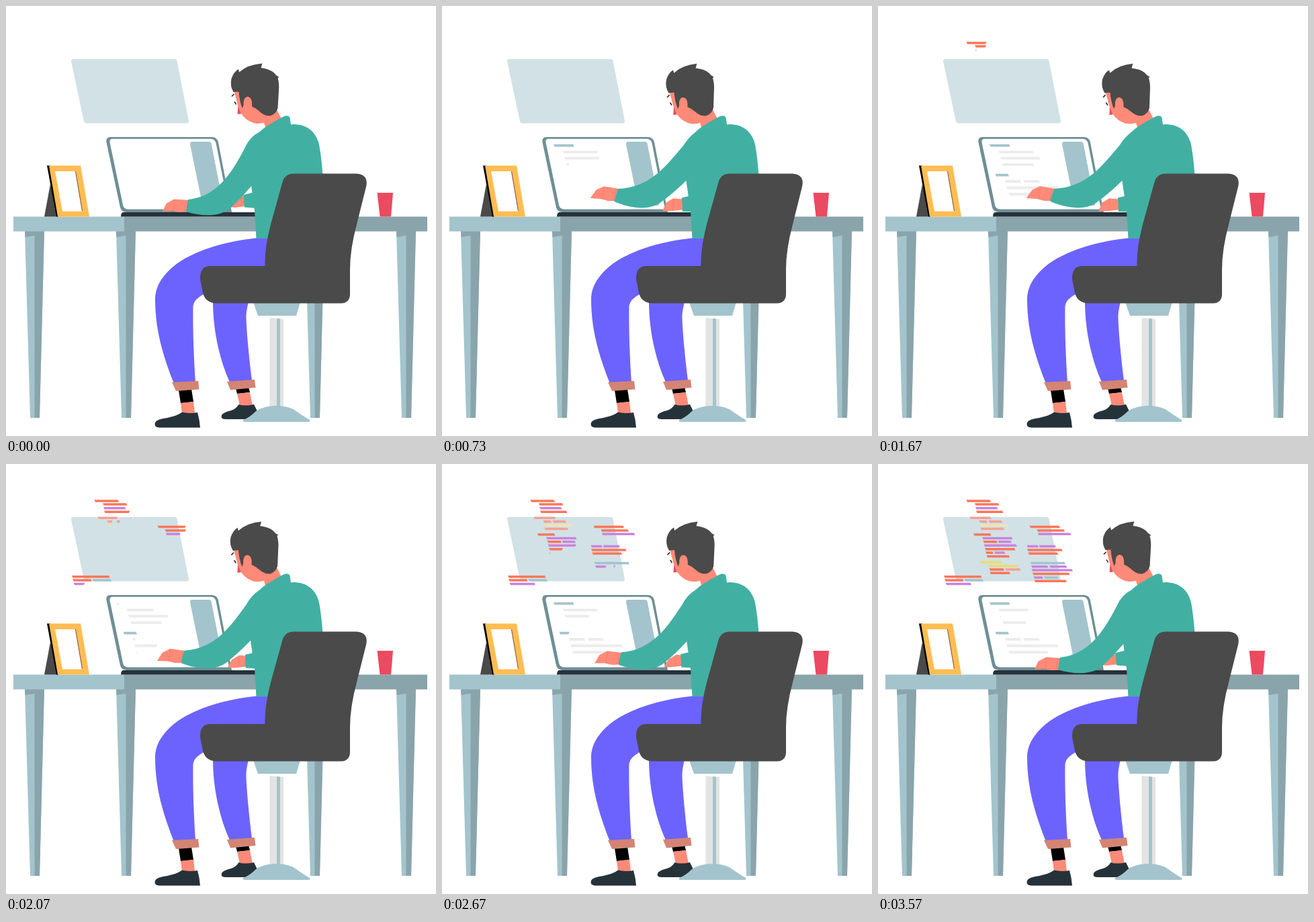
These frames come from a looping animation (640x640 px, 3600 ms). An HTML page:

```html
<!DOCTYPE html>
<html lang="en">
<head>
<meta charset="utf-8">
<title>Working at a desk</title>
<style>
html, body { margin: 0; width: 100%; height: 100%; overflow: hidden; background: #fff; }
svg { display: block; width: 100vw; height: 100vh; }
</style>
</head>
<body>
<svg viewBox="0 0 640 640" xmlns="http://www.w3.org/2000/svg">
  <path d="M100 82H251.500L269 171.500H119Z" fill="#d1e1e6" stroke="#d1e1e6" stroke-width="6" stroke-linejoin="round"/>
  <g id="code"></g>

  <g id="legs"></g>
  <path d="M11 313.500H177V335.500H11Z" fill="#a3c4cc"/>
  <path d="M176 313.500H627V335.500H176Z" fill="#8aa4ab"/>

  <g id="frame">
    <path d="M66 265L57 313.500H78Z" fill="#4a4a4a"/>
    <path d="M61 237.500H66L78 313.500H75Z" fill="#000"/>
    <path d="M64 237.500H111L124 313.500H77Z" fill="#ffbd52"/>
    <path d="M73 246H104L114 305.500H84Z" fill="#fff"/>
    <path d="M103.500 246L113.500 305" stroke="#8a5a3c" stroke-width="1.200"/>
  </g>
  <path d="M552.500 278H576L573 313.500H556.500Z" fill="#ec4a60"/>

  <g id="laptop">
    <path d="M156 195H306Q314 195 316 203L336 307H180Q172 307 170 300L149.500 203Q148 195 156 195Z" fill="#6f8f96"/>
    <path d="M158 197.700H305Q311 198 312.500 204L332 302.500H182Q175 302 174 296L154.500 203Q154 198 158 197.700Z" fill="#fff"/>
    <path d="M277 202H302Q305 202 305.700 205L323 294Q323.500 297 320 297H296Q293 297 292 294L274 206Q273.500 202 277 202Z" fill="#a3c4cc"/>
    <g id="page"></g>
    <path d="M174 307H380V313.500H171Q171 308 174 307Z" fill="#26323a"/>
  </g>

  <path id="backHand" fill="#ff8a78"/>
  <path id="backFinger" fill="none" stroke="#f3776a" stroke-width=".7"/>
  <path id="backSleeve" fill="#41b0a3"/>

  <g id="feet">
    <path d="M342 569L361 567L363 575L344 577Z" fill="#000"/>
    <path d="M344 577L363 575L367 595H348Z" fill="#ff8a78"/>
    <path d="M321 609Q323 605 335 602Q342 600 346.500 593Q355 596 369 593L374 603L373 612Q368 615 355 615H327Q319 615 321 609Z" fill="#26323a"/>
    <path d="M257 572L276 570L279 589L260 591Z" fill="#000"/>
    <path d="M260 591L279 589L281 606H262Z" fill="#ff8a78"/>
    <path d="M222 620Q224 615 240 613Q255 610 262 604.500Q272 607 285 605Q288 615 289 627.500H228Q220 627 222 620Z" fill="#26323a"/>
  </g>
  <g id="pants" fill="#6c63ff">
    <path d="M308 440C308 480 317 525 333 560L366 557C361 520 357 470 357.500 460Q358 452 361 440Z"/>
    <path d="M390 345.500H372C330 350 285 362 255 383C230 402 222 420 222 437C222 480 233 520 250 562L282 560C279 520 278 470 278.500 446Q280 436 296 428L400 420Z"/>
    <path d="M329 559L370 556L371.500 568L334 571.500Z" fill="#d48473"/>
    <path d="M247 560L286 558L287.500 570.500L253 573Z" fill="#d48473"/>
  </g>

  <path d="M380 158L403 154L410 168L386 181Z" fill="#ff8a78"/>
  <g id="head">
    <path d="M339 124L345.500 150Q351 168 368 174Q382 177 391 170L404 152L380 110H345Z" fill="#ff8a78"/>
    <path d="M345.500 149L344.500 161L350 160.500Z" fill="#e8505f"/>
    <path d="M336 134.500L339.500 131M340 142.500Q341.500 144 342.500 146.500" fill="none" stroke="#26262b" stroke-width="1.600"/>
    <path d="M338.500 128Q333 119 335.500 108Q339 98 346 94L347 98.500Q360 87 381.500 85.500L379.500 92Q392 93.500 399 99.500Q402 104 406.500 106L404.500 107Q407 116 406 126L404.500 152Q402 161 393 163.500Q385 164 378 157.500Q372 152 366 149.500Q367 135 359 135Q353 136 353.500 148L351.500 152Q347.500 141 346.500 127.500Z" fill="#4a4a4a"/>
  </g>

  <path id="torso" fill="#41b0a3"/>
  <path id="hand" fill="#ff8a78"/>
  <path id="fingers" fill="none" stroke="#f3776a" stroke-width=".7"/>
  <path id="arm" fill="#41b0a3"/>

  <g id="chair">
    <path d="M392.500 464L413 466V600H392.500Z" fill="#e3e3e3"/>
    <path d="M403 465L408 465.500V600H403Z" fill="#a3c4cc"/>
    <path d="M368 441H438L432 461H375Z" fill="#a3c4cc"/>
    <path d="M353 616Q362 613 372 603Q384 595 402 595Q421 595 432 603Q443 611 452 616Q454 619 449 619H356Q351 619 353 616Z" fill="#a3c4cc"/>
    <path d="M411.500 262Q415 249.500 428 249.500H522Q540 251 536 269L522 325Q511.500 364 512 395V430Q511 442.500 498 442.500H313Q297 442 293 427L289 407Q288 388 303 387H385.500Q384.500 362 394 325Z" fill="#4a4a4a"/>
  </g>
</svg>
<script>
const LOOP = 3600, CYCLE = 1200, TYPE = 200;
const INK = { o: '#fa775b', p: '#cc83dc', b: '#a3c4cc', y: '#ecdc72', l: '#f5a193', c: '#f0e5b2', g: '#ececec' };
const el = id => document.getElementById(id);
const clamp = v => Math.max(0, Math.min(1, v));

function add(parent, fill, d = '') {
  const p = document.createElementNS('http://www.w3.org/2000/svg', 'path');
  p.setAttribute('fill', fill);
  p.setAttribute('d', d);
  parent.append(p);
  return p;
}

for (const x of [28, 164, 445, 581]) {
  add(el('legs'), '#a3c4cc', `M${x} 335h29l-7 278h-14Z`);
  add(el('legs'), '#8aa4ab', `M${x + 14.5} 335h14.500l-7 278h-7.500ZM${x} 335h15v6.500l-14.500 2.500Z`);
}

// Left code column: x, y, width, ink, delay; lines start from top to bottom
const column = [
  [131.5, 55, 35, 'o', 0], [144, 60, 35, 'o', 0], [145, 65.7, 32, 'p', 0], [146, 71.3, 39, 'o', 130],
  [136.5, 80.3, 31, 'l', 0], [150.5, 85.7, 11, 'l', -40], [164.5, 85.7, 19, 'l', 50],
  [151.5, 91.3, 41, 'c', 0], [152.5, 96.5, 34, 'l', 0], [142, 105, 25, 'o', 0],
  [155, 110.5, 44, 'p', 0], [156.5, 115.7, 20, 'o', -40], [178.5, 115.7, 19, 'p', 40],
  [157.5, 121.3, 48, 'p', 0], [159, 126.7, 44, 'o', 0], [160, 132, 10.5, 'o', 0], [173, 132, 15, 'p', 50],
  [161.500, 137.5, 33, 'o', 0], [151, 146.3, 32, 'y', 0], [164, 151.7, 43, 'y', 0],
  [165.500, 157, 21, 'o', 0], [189, 157, 22, 'l', 90], [166.500, 162.3, 29, 'o', 60]
].map(([x, y, w, ink, late]) => [x, y, w, ink, 2040 + (y - 91) * 15 + late]);

// Other code groups: x, y, width, ink, start time
const groups = [
  [98, 167.7, 55, 'o', 1760], [99, 173, 27, 'o', 1820], [128.500, 173, 27, 'b', 1870], [100.500, 178.5, 37, 'p', 1980],
  [225.500, 93.5, 44, 'o', 1880], [236.500, 99, 40, 'o', 1914], [238, 104.2, 48, 'p', 1980],
  [221.500, 122.5, 16, 'p', 2160], [239.500, 122.5, 24, 'p', 2240], [222, 128, 51, 'o', 2280],
  [223.500, 133.3, 43, 'o', 2350], [226.500, 147.5, 51, 'b', 2430],
  [228, 152.8, 24, 'p', 2530], [255, 152.8, 25, 'p', 2646], [228.500, 158, 60, 'p', 2810],
  [230, 163.5, 54, 'o', 2844], [231.500, 169, 13, 'p', 2800], [247, 169, 20, 'b', 2914], [232.500, 174.3, 47, 'o', 2916]
];

// Page lines: x, y, width, ink, start time, times when the line is erased and typed again
const page = [
  [166, 207.7, 29, 'b', 220, 2070, 2914],
  [179.500, 217.3, 51, 'g', 390, 1355, 2230, 3396],
  [182, 226.5, 58, 'g', 550, 1458, 2542, 3570],
  [185, 236.2, 46, 'g', 710, 2670, 3186, 3726],
  [174.500, 251.700, 19, 'b', 850, 2510, 2910],
  [188.500, 261, 23, 'g', 920, 2110, 3000],
  [216.500, 261, 23, 'g', 990, 2070, 2980],
  [191, 270.500, 76, 'g', 1040, 2162, 3000],
  [194, 280.2, 58, 'g', 1120, 2070, 3082]
];

const code = [...column, ...groups].map(r => ({ r, node: add(el('code'), INK[r[3]]) }));
const text = page.map(r => ({ r, node: add(el('page'), INK[r[3]]) }));

// Slanted bar; the typing edge leans the other way
function bar(node, [x, y, w], part, h) {
  const len = w * part, lean = part < 1 ? -Math.min(1.5, len) : 1.5;
  node.setAttribute('d', part > 0
    ? `M${x} ${y - h / 2}h${len}l${lean} ${h}H${x + 1.500}Z` : '');
}

// Two poses per moving part with matching numbers
const poses = {
  torso: [
    'M372 200L378 187Q384 180 412 165Q420 161 422.500 166L424 176.500Q430 175 440 177.500Q460 183 466 206Q470 228 472 260L395 346H372.500L370 305L365 267Z',
    'M372 200L378 187Q384 180 412 165Q420 161 422.500 166L424 176.500Q430 175 440 177.500Q460 183 466 206Q470 228 472 260L395 346H372.500L370 305L363 258Z'],
  arm: [
    'M378 187Q362 195 355 212C338 245 315 284 271 288Q269 297 268 306C290 313 318 315 335 300Q352 284 366 267L392 220Z',
    'M378 187Q367 196 360 207C335 234 312 268 261 270Q257 280 255 289C280 300 305 303 322 293Q345 277 364 258L392 220Z'],
  hand: [
    'M233 306L238.500 294L250 287.500L273 289L270 306L259 307L247 305Z',
    'M219 283.500L228.500 271L240 266L263 270L257 288L246 288L236 285Z'],
  fingers: ['M251 288L249 305M268 289L265 306', 'M240 266L237 285M258 270L254 288'],
  backHand: [
    'M333 299L340 289L354 281L357 283V298L340 300Z',
    'M327.500 306L333 293L343 287L359 288V304L340 306Z'],
  backFinger: ['M350 284L350 298', 'M344 288L343 305'],
  backSleeve: [
    'M354 281L368 277.500L373 301L355 299.500Q353 290 354 281Z',
    'M357 286L368 283.500L373 307L358 306.500Q359 296 357 286Z']
};
const NUM = /-?\d+(\.\d+)?/g;
const rigs = Object.entries(poses).map(([id, [a, b]]) => ({ node: el(id), a, ends: b.match(NUM) }));

function draw(t) {
  const k = (1 - Math.cos(2 * Math.PI * t / CYCLE)) / 2;
  for (const { node, a, ends } of rigs) {
    let i = 0;
    node.setAttribute('d', a.replace(NUM, n => (+n + (ends[i++] - n) * k).toFixed(2)));
  }
  el('head').setAttribute('transform', `rotate(${-1.6 * k} 395 172)`);
  for (const { r, node } of code) bar(node, r, clamp((t - r[4]) / TYPE), 3.4);
  for (const { r, node } of text) {
    const gaps = r.slice(5).map(d => Math.abs(t - d));
    bar(node, r, clamp(Math.min(t - r[4], ...gaps) / TYPE), 3.8);
  }
}

const begin = performance.now();
function tick() {
  draw((performance.now() - begin) % LOOP);
  requestAnimationFrame(tick);
}
tick();
</script>
</body>
</html>
```
